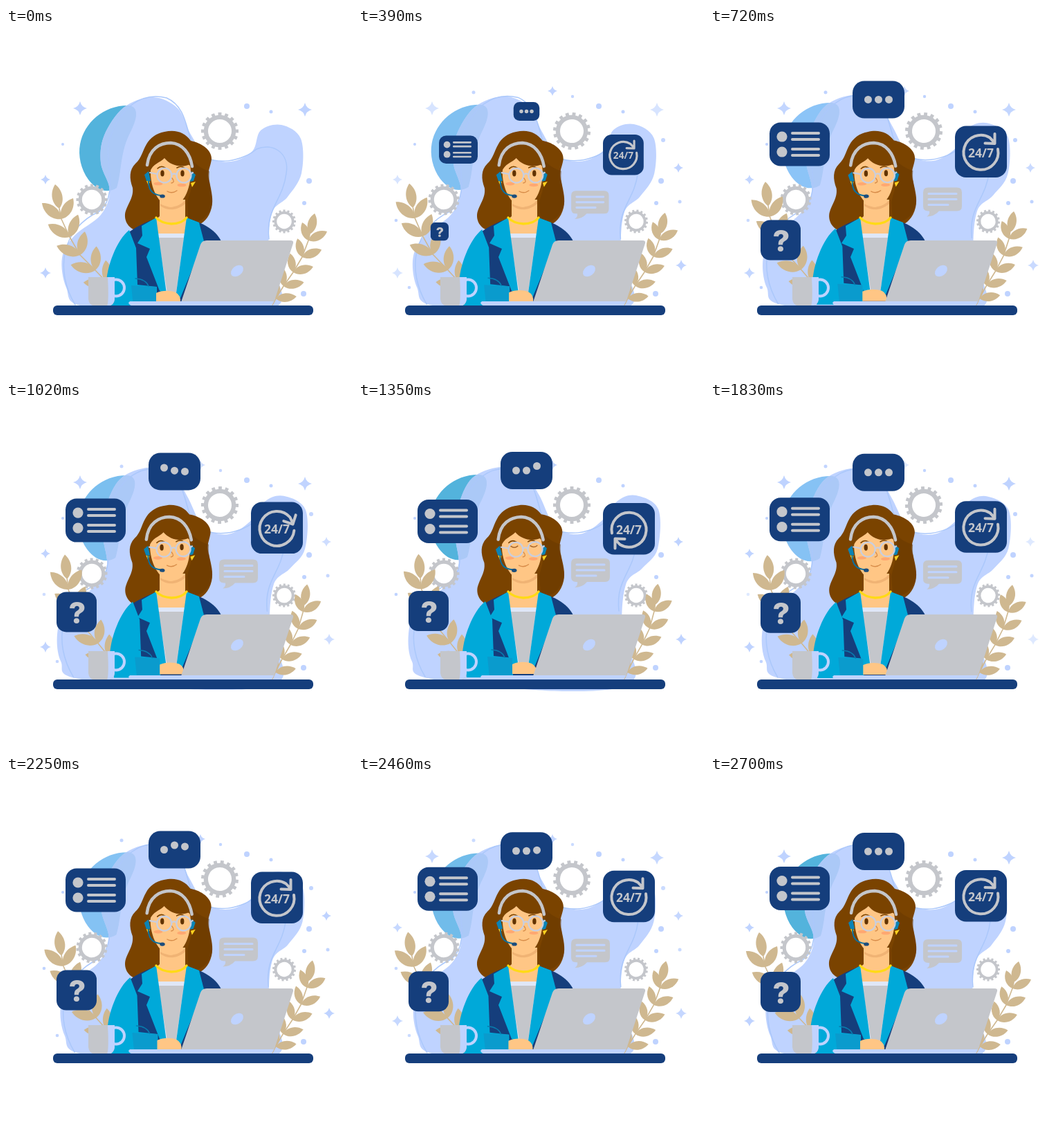
Write an HTML page that moves like this. It is 500x500 px and loops after 2730 ms.

```html
<!DOCTYPE html>
<html lang="en">
<head>
<meta charset="utf-8">
<title>Customer support</title>
<style>
html, body { margin: 0; width: 100%; height: 100%; overflow: hidden; background: #fff; }
svg { display: block; width: 100vw; height: 100vh; }
.navy { fill: #153e7c; }
.cyan { fill: #00a9d9; }
.grey { fill: #c4c6cb; }
.pale { fill: #bfd3ff; }
.skin { fill: #ffc685; }
.hair { fill: #7a4300; }
.leaf { fill: #cfb890; }
.line { fill: none; stroke-linecap: round; stroke-linejoin: round; }
.mark { stroke: #c4c6cb; }
text { font-weight: 700; text-anchor: middle; }
</style>
</head>
<body>
<svg viewBox="0 0 500 500">
  <defs>
    <clipPath id="inBlob"><path id="clip"/></clipPath>
    <path id="bean" d="M178 112C192 114 190 130 181 148C164 180 168 205 160 231C146 240 130 234 119 219C108 204 104 184 107 168C113 136 142 111 178 112Z"/>
  </defs>

  <use id="backBean" href="#bean"/>
  <path id="blob" class="pale"/>
  <g clip-path="url(#inBlob)"><use id="frontBean" href="#bean" fill="#abc9f7"/></g>
  <path id="trace" class="line" stroke="#abc8fb" stroke-width="1.5" d="M100 400C70 350 80 290 135 265C165 240 140 190 150 160C165 115 195 92 232 101C262 114 260 150 272 175C300 205 345 190 362 175C385 165 410 180 405 210C400 250 375 260 380 305"/>

  <g id="sky" class="pale"></g>
  <g id="gears"></g>
  <g id="leftTwig"></g>
  <g id="rightTwig"></g>

  <g id="head">
    <path class="hair" d="M229 150C245 146 259 151 267 163C283 166 298 177 297 190C295 203 290 207 294 222C297 237 300 248 297 260C293 276 284 282 276 286L196 294C179 293 171 281 172 269C174 256 185 246 183 231C178 217 178 205 187 196C196 188 197 178 203 168C208 159 217 152 229 150Z"/>
    <path fill="#693900" d="M267 188C276 214 266 237 262 252L264 282C281 282 296 271 298 252C298 240 292 224 294 207C284 204 274 198 267 188Z" opacity=".55"/>
  </g>

  <path class="navy" d="M176 296C190 286 205 279 218 275L262 275C282 281 302 290 311 308L290 402H184Z"/>
  <path class="skin" d="M222 248H259V274L264 278L258 300H220L215 278L222 272Z"/>
  <path fill="#f0b374" d="M223 254C235 261 248 260 259 249V254C247 264 234 265 223 257Z"/>
  <path fill="#dfe7f8" d="M218 297H260L247 392H232Z"/>
  <path class="grey" d="M220 303H257L245 389H234Z"/>
  <path class="cyan" d="M217 274L196 286L197 300L190 311L208 319L203 331L222 380L232 384Z"/>
  <path class="cyan" d="M261 274L279 281L286 308L252 390H245Z"/>
  <path class="line" stroke="#ffda16" stroke-width="3.4" d="M217 274Q224 282 239 283Q254 283 261 274"/>

  <g id="face">
    <path fill="#0b83b5" d="M200 212L206 207L209 221L203 221ZM274 212L268 207L266 222L271 221Z"/>
    <path class="skin" d="M209 205C209 187 223 181 240 181C258 181 267 192 267 207C267 234 256 257 238 259C221 256 208 232 209 205Z"/>
    <path fill="#ffd21f" d="M203 221L208 222L206 228ZM274 222L267 224L269 230Z"/>
    <path class="hair" d="M204 204C204 180 220 165 239 165C259 167 270 183 271 207C267 202 266 197 263 198C251 202 237 198 229 188C222 195 212 196 208 208Z"/>
    <path class="line" stroke="#c4c6cb" stroke-width="4.5" d="M204 198C207 174 223 166 238 166C255 167 266 181 269 200"/>
    <g fill="#ffa871"><ellipse cx="220" cy="225" rx="6.5" ry="2.3"/><ellipse cx="254" cy="227" rx="6.500" ry="2.3"/></g>
    <path class="line" stroke="#7a4300" stroke-width="1.6" d="M219 203Q224 198 230 202M247 202Q253 198 259 203"/>
    <g id="eyes" fill="#623300"><ellipse cx="226" cy="210" rx="2.700" ry="4.500"/><ellipse cx="255" cy="210" rx="2.700" ry="4.500"/></g>
    <path id="lids" class="line" stroke="#a5652b" stroke-width="1.5" d="M222 208Q227 212 232 208M250 208Q255 212 260 208"/>
    <g class="line" stroke="#c9cede" stroke-width="2.2"><circle cx="229" cy="213" r="10.5"/><circle cx="257" cy="213" r="10.5"/><path d="M239.500 212Q243 209 246.500 212M218.500 211L208 209M267 211L270 209"/></g>
    <path class="line" stroke="#d78c49" stroke-width="1.3" d="M240 217Q245 223 239 224M233 236Q240 240 247 235"/>
    <path class="line" stroke="#0b6f9f" stroke-width="2" d="M206 222C206 234 212 241 224 242"/>
    <ellipse cx="226" cy="243" rx="3.800" ry="2.600" fill="#1b4d7c"/>
  </g>

  <g id="arm">
    <path class="cyan" d="M178 292C160 306 145 346 145 371L151 402H218V374L190 371L188 318Z"/>
    <path fill="#0a9bcd" d="M181 372L217 374V402H184Z"/>
    <path class="line" stroke="#087cae" stroke-width="1.5" d="M187 362Q202 363 206 373"/>
    <path class="skin" d="M217 383C225 379 237 379 245 382Q253 386 252 397H217Z"/>
  </g>
  <path class="grey" d="M290 307H411Q416 307 415 311L388 394Q386 399 382 399H252L281 313Q283 307 290 307Z"/>
  <ellipse class="pale" cx="334" cy="351" rx="10" ry="7" transform="rotate(-38 334 351)"/>
  <path class="pale" d="M179 395H387Q385 402 380 402H184Q178 401 177 397Z"/>

  <circle class="line" stroke="#bfd3ff" stroke-width="4" cx="159" cy="375.500" r="12"/>
  <path class="grey" d="M119 360H157V392Q156 401 148 402H129Q120 401 119 392Z"/>
  <path class="pale" d="M147 360H157V392Q156 401 146 402Q149 395 147 360Z"/>
  <rect class="navy" x="68" y="401" width="376" height="14" rx="6"/>

  <g id="chat">
    <path class="grey" d="M315 236H357Q364 236 364 243V263Q364 270 357 270H331Q324 278 313 278Q318 275 317 270H315Q308 270 308 263V243Q308 236 315 236Z"/>
    <path class="line" stroke="#bfd3ff" stroke-width="3" d="M316 245H356M316 253H356M316 261H344"/>
  </g>
  <g id="hours">
    <rect class="navy" x="354" y="136" width="75" height="74.500" rx="16"/>
    <g id="ring" class="line mark" stroke-width="4">
      <path d="M24.500 -5A25 25 0 1 1 13 -21.500L20 -14M20 -27V-13L6 -13.500"/>
    </g>
    <text class="grey" x="391.500" y="181" font-size="17.500" font-family="'Open Sans', sans-serif">24/7</text>
  </g>
  <g id="list">
    <rect class="navy" x="86" y="131" width="87" height="63" rx="16"/>
    <g class="grey"><circle cx="104" cy="151.500" r="7.600"/><circle cx="104" cy="173.500" r="7.600"/></g>
    <path class="line mark" stroke-width="4" d="M119 146.500H157M119 155.500H157M119 169.500H157M119 178.500H157"/>
  </g>
  <g id="typing">
    <rect class="navy" x="206" y="82" width="75" height="54" rx="17"/>
    <g id="dots" class="grey"><circle cx="228.500" cy="109" r="5.500"/><circle cx="243.500" cy="109" r="5.500"/><circle cx="258.500" cy="109" r="5.500"/></g>
  </g>
  <g id="ask">
    <rect class="navy" x="73" y="283" width="58" height="58" rx="14"/>
    <text class="grey" x="103" y="328.500" font-size="43" font-family="Inter, sans-serif" style="font-weight:800">?</text>
  </g>
</svg>
<script>
const LOOP = 2730, STEP = 30, SWAY = 2700;
const $ = id => document.getElementById(id);
const set = (el, name, value) => el.setAttribute(name, value);
const clamp = v => Math.max(0, Math.min(1, v));
const smooth = v => { v = clamp(v); return v * v * (3 - 2 * v); };
const lerp = (a, b, k) => a + (b - a) * k;

function add(parent, tag, attrs) {
  const el = document.createElementNS('http://www.w3.org/2000/svg', tag);
  for (const key in attrs) set(el, key, attrs[key]);
  return parent.appendChild(el);
}

// Background shape: two poses, joined by a smooth closed curve
const rest = [[112,402],[87,375],[81,332],[99,300],[137,270],[150,235],[137,195],[142,155],
  [170,115],[212,100],[248,116],[266,152],[290,186],[325,193],[356,178],[368,148],
  [398,140],[426,160],[427,210],[407,244],[384,268],[380,330],[392,402],[250,402]];
const raised = [[105,400],[78,375],[73,335],[85,298],[122,270],[145,238],[140,190],[145,150],
  [165,110],[205,94],[240,102],[262,135],[285,180],[320,191],[352,172],[375,143],
  [402,135],[434,155],[433,212],[411,240],[387,264],[382,330],[398,402],[300,418]];

function closedCurve(pts) {
  const n = pts.length, at = i => pts[(i + n) % n];
  let d = 'M' + pts[0];
  for (let i = 0; i < n; i++) {
    const [a, b, c, e] = [at(i - 1), at(i), at(i + 1), at(i + 2)];
    d += 'C' + [0, 1].map(k => b[k] + (c[k] - a[k]) / 6) +
         ' ' + [0, 1].map(k => c[k] - (e[k] - b[k]) / 6) + ' ' + c;
  }
  return d + 'Z';
}

// Twinkling stars and dots: x, y, radius, rhythm
const pulse = (period, shift = 0) => t => Math.abs(Math.sin(Math.PI * (t / period + shift)));
const rhythm = { on: () => 1, even: pulse(900, .5), odd: pulse(900), slow: pulse(1350) };
const stars = [[107,116,10,'even'],[432,118,10,'even'],[57,219,7,'even'],[57,354,8,'even'],
  [281,91,7,'odd'],[463,202,7,'odd'],[467,343,8,'odd']];
const specks = [[348,113,4,'on'],[383,121,2.5,'on'],[82,168,2,'on'],[438,221,4,'on'],[431,253,3,'on'],
  [430,384,4,'on'],[55,278,2.3,'odd'],[167,93,2.5,'slow'],[310,99,2.2,'slow'],
  [441,162,3,'slow'],[465,251,2.5,'slow'],[74,375,2.3,'slow']];
const sparkles = [
  ...stars.map(([x, y, r, beat]) => {
    const q = r * .2;
    const d = `M0 ${-r}Q${q} ${-q} ${r} 0Q${q} ${q} 0 ${r}Q${-q} ${q} ${-r} 0Q${-q} ${-q} 0 ${-r}Z`;
    return { el: add($('sky'), 'path', { d, transform: `translate(${x} ${y})` }), beat };
  }),
  ...specks.map(([cx, cy, r, beat]) => ({ el: add($('sky'), 'circle', { cx, cy, r }), beat }))
];

// Gears: centre, outer radius, turn direction
const TEETH = 16;
const gears = [[309,149,27,1],[124,248,22.5,-1],[402,279.5,17,1]].map(([x, y, r, dir]) => {
  const g = add($('gears'), 'g', {}), rim = r * .86, hole = r * .63;
  add(g, 'circle', { r: (rim + hole) / 2, fill: 'none', stroke: '#c4c6cb', 'stroke-width': rim - hole });
  for (let i = 0; i < TEETH; i++)
    add(g, 'rect', { class: 'grey', x: -r * .09, y: -r, width: r * .18, height: r * .2, transform: `rotate(${i * 360 / TEETH})` });
  return { g, x, y, dir };
});

// Twigs: a stem with a leaf to each side of every node, turning along the stem
function leaf(g, [x, y], [dx, dy], turn = 0) {
  const px = -dy * .28, py = dx * .28;
  add(g, 'path', { class: 'leaf', transform: `translate(${x} ${y}) rotate(${turn})`,
    d: `M0 0C${dx * .25 + px} ${dy * .25 + py} ${dx * .7 + px} ${dy * .7 + py} ${dx} ${dy}` +
       `C${dx * .7 - px} ${dy * .7 - py} ${dx * .25 - px} ${dy * .25 - py} 0 0Z` });
}
function twig(g, nodes, base, top, a, b, turn) {
  add(g, 'polyline', { class: 'line', stroke: '#cfb890', 'stroke-width': 1.6, points: [...nodes, base].join(' ') });
  leaf(g, nodes[0], top);
  nodes.slice(1).forEach((n, i) => { leaf(g, n, a, i * turn); leaf(g, n, b, i * turn); });
}
twig($('leftTwig'), [[77,261],[80,276],[92,302],[107,328],[129,350],[148,370]], [150,400], [-6,-35], [-28,-23], [17,-30], -9);
twig($('rightTwig'), [[439,298],[437,307],[428,331],[415,353],[401,373],[390,391]], [385,400], [7,-30], [27,-13], [-9,-26], 5);

// Cards: origin of growth, start of growth, drift
const cards = [
  ['chat', 311, 278, 120, -10],
  ['hours', 354, 210.5, 180, 10],
  ['list', 173, 194, 211, 10],
  ['typing', 243.5, 136, 240, -10],
  ['ask', 131, 283, 250, -10]
];
const GROW = 300;

function hop(t, i) {
  if (t < 870) return 0;
  const age = (t - 870) % 1020 - i * 120;
  if (age < 0 || age > 360) return 0;
  return -6.5 * (age < 240 ? Math.sin(age / 240 * Math.PI / 2) : smooth((360 - age) / 120));
}

function draw(t) {
  const p = (1 - Math.cos(2 * Math.PI * t / SWAY)) / 2;
  const shape = closedCurve(rest.map((a, i) => a.map((v, k) => lerp(v, raised[i][k], p))));
  set($('blob'), 'd', shape);
  set($('clip'), 'd', shape);

  const tint = rhythm.slow(t);
  const mix = [[83, 140], [179, 196], [220, 247]].map(([a, b]) => lerp(a, b, tint));
  set($('backBean'), 'fill', `rgb(${mix.map(Math.round)})`);
  set($('bean'), 'transform', `translate(${-2 * p} ${-7 * p})`);
  set($('trace'), 'transform', `translate(${-3 * p} ${-3 * p})`);

  sparkles.forEach(s => set(s.el, 'opacity', rhythm[s.beat](t) ** .3 * (rhythm[s.beat](t) > .01)));
  gears.forEach(({ g, x, y, dir }) => set(g, 'transform', `translate(${x} ${y}) rotate(${dir * 360 * t / SWAY})`));
  set($('leftTwig'), 'transform', `rotate(${5.3 * p} 148 400)`);
  set($('rightTwig'), 'transform', `rotate(${-5.4 * p} 385 400)`);

  for (const id of ['head', 'face']) set($(id), 'transform', `rotate(${-1.4 * p} 238 255)`);
  set($('arm'), 'transform', `translate(${6 * p} ${-4 * p})`);
  const open = smooth((Math.abs(t - 1350) - 45) / 90);
  set($('eyes'), 'transform', `translate(0 ${210 * (1 - open)}) scale(1 ${open})`);
  set($('lids'), 'opacity', open < .15 ? 1 : 0);

  for (const [id, x, y, start, drift] of cards) {
    const s = smooth((t - start) / GROW);
    set($(id), 'transform', `translate(${x} ${y + drift * p}) scale(${s}) translate(${-x} ${-y})`);
  }
  set($('ring'), 'transform', `translate(391.5 174.5) rotate(${360 * smooth((t - 900) / 900)})`);
  [...$('dots').children].forEach((dot, i) => set(dot, 'cy', 109 + hop(t, i)));
}

function tick() {
  draw(Math.floor(performance.now() % LOOP / STEP) * STEP);
  requestAnimationFrame(tick);
}
tick();
</script>
</body>
</html>
```
